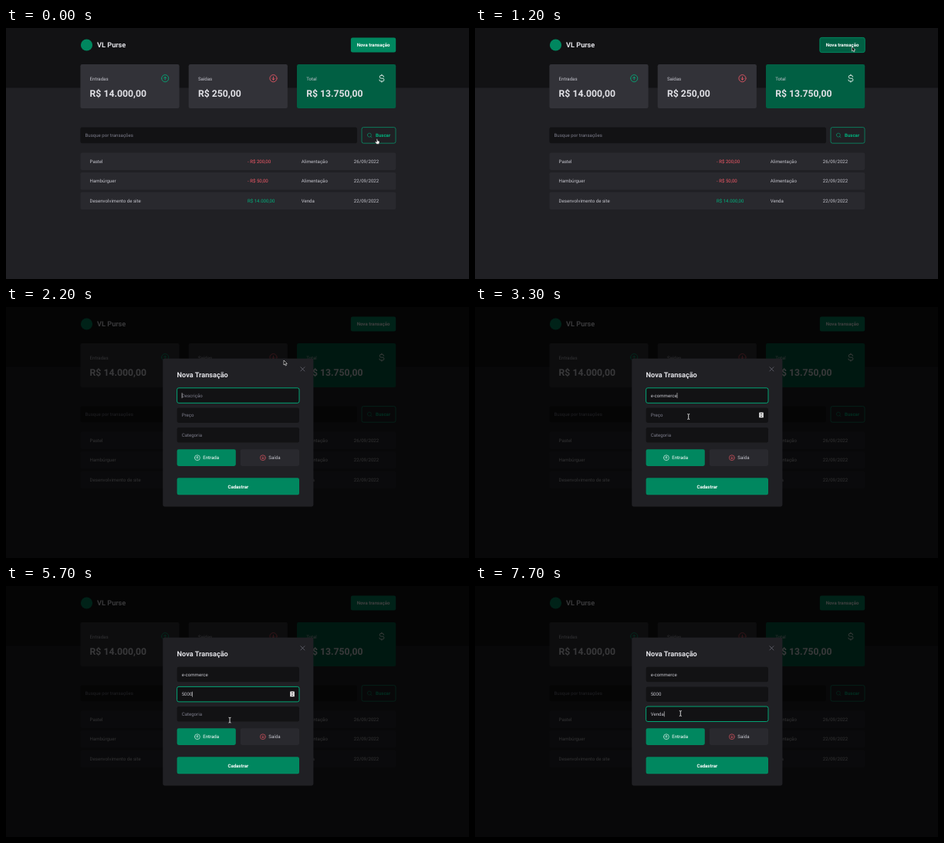
An HTML page that plays this animation: 600 px wide and 325 px high, repeating every 8 s.

```html
<!DOCTYPE html>
<html lang="pt-BR">
<head>
<meta charset="utf-8">
<title>Transações</title>
<style>
html, body { margin: 0; width: 100%; height: 100%; overflow: hidden; background: #202024; }
svg { display: block; width: 600px; height: 325px; font: 6.1px Roboto, sans-serif; text-rendering: geometricPrecision; }
</style>
</head>
<body>
<svg id="stage" viewBox="0 0 600 325" xmlns="http://www.w3.org/2000/svg"></svg>
<script>
const LOOP = 8000, STEP = 100;
const GREEN = '#00875f', DARK_GREEN = '#015f43', LIGHT_GREEN = '#00b37e', RED = '#f75a68';
const INK = '#121214', PANEL = '#202024', ROW = '#29292e', CARD = '#323238';
const TEXT = '#e1e1e6', SOFT = '#c4c4cc', MUTED = '#7c7c8a';

const rect = (x, y, w, h, fill, extra = '') =>
  `<rect x="${x}" y="${y}" width="${w}" height="${h}" rx="2.3" fill="${fill}" ${extra}/>`;
const label = (x, y, text, fill = TEXT, extra = '') =>
  `<text x="${x}" y="${y}" fill="${fill}" ${extra}>${text}</text>`;
const bold = (x, y, text, fill, size = 6.1, anchor = 'start') =>
  label(x, y, text, fill, `font-weight="700" font-size="${size}" text-anchor="${anchor}"`);

// Icons are drawn on a 256 unit grid around their centre.
const icon = (x, y, size, color, path, turn = 0) =>
  `<path transform="translate(${x} ${y}) rotate(${turn}) scale(${size / 256}) translate(-128 -128)" d="${path}"
    fill="none" stroke="${color}" stroke-width="17" stroke-linecap="round" stroke-linejoin="round"/>`;
const ARROW = 'M32 128a96 96 0 1 0 192 0a96 96 0 1 0-192 0M94 122L128 88L162 122M128 168V88';
const DOLLAR = 'M128 24V48M128 208V232M184 88a40 40 0 0 0-40-40H112a40 40 0 0 0 0 80h40a40 40 0 0 1 0 80H104a40 40 0 0 1-40-40';
const LENS = 'M32 116a84 84 0 1 0 168 0a84 84 0 1 0-168 0M175 175L224 224';
const CROSS = 'M200 56L56 200M200 200L56 56';

const card = (x, title, amount, fill) =>
  rect(x, 46.9, 128.2, 57.2, fill) + label(x + 12.2, 67.5, title, SOFT) + bold(x + 12.2, 89, amount, TEXT, 12.2);

const row = ([name, price, kind, date], i) => {
  const y = 161.4 + i * 25.55, base = y + 13.4;
  return rect(96.4, y, 408.9, 22.5, ROW) + label(108.6, base, name, SOFT) +
    label(313, base, price, price[0] === '-' ? RED : LIGHT_GREEN) +
    label(382.7, base, kind, SOFT) + label(450.8, base, date, SOFT);
};

const page = `
  <rect width="600" height="325" fill="${PANEL}"/>
  <rect width="600" height="77.5" fill="${INK}"/>
  <circle cx="104.5" cy="22" r="7.6" fill="${GREEN}"/>
  ${bold(118, 25.2, 'VL Purse', TEXT, 9.16)}
  ${rect(446.9, 12.4, 58.3, 19.2, GREEN, 'id="newButton" stroke-width="1"')}
  ${bold(476, 24.2, 'Nova transação', '#fff', 6.1, 'middle')}
  ${card(96.4, 'Entradas', 'R$ 14.000,00', CARD)}
  ${card(236.7, 'Saídas', 'R$ 250,00', CARD)}
  ${card(377, 'Total', 'R$ 13.750,00', DARK_GREEN)}
  ${icon(206.2, 65.2, 12.2, LIGHT_GREEN, ARROW)}
  ${icon(346.5, 65.2, 12.2, RED, ARROW, 180)}
  ${icon(486.9, 65.2, 12.2, '#fff', DOLLAR)}
  ${rect(96.4, 128.5, 358.6, 20.8, INK)}
  ${label(102.5, 141.2, 'Busque por transações', MUTED)}
  ${rect(461, 128.6, 44, 20.6, 'none', `stroke="${LIGHT_GREEN}" stroke-width=".6"`)}
  ${icon(471.2, 139, 7.6, LIGHT_GREEN, LENS)}
  ${bold(479, 141.2, 'Buscar', LIGHT_GREEN)}
  ${[
    ['Pastel', '- R$ 200,00', 'Alimentação', '26/09/2022'],
    ['Hambúrguer', '- R$ 50,00', 'Alimentação', '22/09/2022'],
    ['Desenvolvimento de site', 'R$ 14.000,00', 'Venda', '22/09/2022']
  ].map(row).join('')}`;

const hints = ['Descrição', 'Preço', 'Categoria'];
const fieldTop = i => 104.8 + i * 25.6;
const field = (_, i) =>
  rect(221.6, fieldTop(i), 158.4, 19.5, INK, `id="box${i}" stroke-width=".9"`) +
  label(227.7, fieldTop(i) + 12, '', MUTED, `id="value${i}"`);

const modal = `<g id="modal">
  <rect width="600" height="325" opacity=".75"/>
  ${rect(203.2, 66.8, 195.2, 191.6, PANEL)}
  ${bold(221.6, 90.5, 'Nova Transação', TEXT, 9.16)}
  <rect id="closeRing" x="379.5" y="75.4" width="10" height="10" fill="none" stroke="${LIGHT_GREEN}" stroke-width=".8"/>
  ${icon(384.4, 80.4, 9.15, MUTED, CROSS)}
  ${hints.map(field).join('')}
  <g id="spinner"><rect x="368.2" y="136.4" width="5.6" height="6.9" rx=".6" fill="#e8e8e8"/>
    <path d="M369.6 139.1L371 137.6L372.4 139.1ZM369.6 140.7L371 142.2L372.4 140.7Z" fill="#333"/></g>
  <rect id="caret" width=".5" height="7" fill="#fff"/>
  ${rect(221.6, 184.3, 76.2, 21.6, GREEN)}${rect(303.8, 184.3, 76.2, 21.6, ROW)}
  ${icon(247.9, 195.2, 9.15, '#fff', ARROW)}${label(255.2, 197.4, 'Entrada', '#fff')}
  ${icon(332.9, 195.2, 9.15, RED, ARROW, 180)}${label(340.3, 197.4, 'Saída', SOFT)}
  ${rect(221.6, 221.2, 158.4, 22, GREEN)}
  ${bold(300.8, 234.5, 'Cadastrar', '#fff', 6.1, 'middle')}
</g>`;

const pointers = `
  <path id="arrow" d="M0 0V6L1.4 4.8L2.4 7L3.4 6.5L2.5 4.4H4.3Z" fill="#000" stroke="#fff" stroke-width=".6"/>
  <path id="beam" d="M-1.5-3.4Q0-3.4 0-2.6Q0-3.4 1.5-3.4M0-2.6V2.6M-1.5 3.4Q0 3.4 0 2.6Q0 3.4 1.5 3.4" fill="none" stroke="#fff" stroke-width=".8"/>
  <path id="hand" d="M-.8-3Q0-3.8 .4-3L.8-.9L2.5-.4Q3.2 0 2.9 1.2L2.3 3.2H-.7L-2.6 .7Q-2.4-.3-1.3 .2L-.4 .7Z" fill="#fff" stroke="#111" stroke-width=".4"/>`;

document.getElementById('stage').innerHTML = page + modal + pointers;
const $ = id => document.getElementById(id);
const show = (id, on) => $(id).setAttribute('display', on ? 'inline' : 'none');

// Pointer stops: time, x, y.
const stops = [
  [0, 481, 147], [200, 400, 184], [400, 203, 217], [600, 290, 165], [900, 440, 25],
  [1000, 475, 25], [1100, 488.5, 24], [1200, 488.5, 24], [1300, 463, 50],
  [1500, 410, 105], [1800, 330, 190], [2100, 300, 114], [2300, 420, 24],
  [2500, 466.5, 90], [3100, 466.5, 90], [3300, 276.7, 142], [3600, 292, 140],
  [3700, 294, 140], [5400, 294, 140], [5600, 301, 178], [5900, 268, 165],
  [6100, 268, 165], [6200, 267, 165], [6600, 267, 165], [7700, 266.3, 165], [LOOP, 266.3, 165]
];
const hiddenSpans = [[2800, 3200], [4200, 5500], [6700, 7700]];

// Each field: when focus arrives and when each piece of text is typed.
const typed = [
  { focus: 2100, keys: [[2800, 'e-'], [2900, 'co'], [3000, 'mm'], [3100, 'er'], [3200, 'ce']] },
  { focus: 3500, keys: [[4100, '5'], [4500, '0'], [4700, '0'], [5000, '0']] },
  { focus: 6000, keys: [[6700, 'V'], [7000, 'e'], [7100, 'n'], [7300, 'd'], [7500, 'a']] }
];

function pointerAt(t) {
  const i = stops.findIndex(s => s[0] > t);
  const [t0, x0, y0] = stops[i - 1], [t1, x1, y1] = stops[i];
  const k = (t - t0) / (t1 - t0);
  return [x0 + (x1 - x0) * k, y0 + (y1 - y0) * k];
}

const inside = (x, y, left, top, right, bottom) => x > left && x < right && y > top && y < bottom;

function drawPointer(t, x, y, open) {
  const overField = open
    ? hints.some((_, i) => inside(x, y, 221.6, fieldTop(i), 380, fieldTop(i) + 19.5))
    : inside(x, y, 96, 128, 455, 149);
  const overSearch = !open && inside(x, y, 461, 128, 505, 149);
  const kind = overField ? 'beam' : overSearch ? 'hand' : 'arrow';
  const hidden = hiddenSpans.some(([from, to]) => t >= from && t < to);
  for (const id of ['arrow', 'beam', 'hand']) show(id, id === kind && !hidden);
  $(kind).setAttribute('transform', `translate(${x} ${y})`);
}

function drawForm(t, x, y) {
  const focused = typed.filter(f => t >= f.focus).length - 1;
  typed.forEach(({ keys }, i) => {
    const value = keys.filter(k => t >= k[0]).map(k => k[1]).join('');
    const node = $('value' + i);
    node.textContent = value || hints[i];
    node.setAttribute('fill', value ? SOFT : MUTED);
    $('box' + i).setAttribute('stroke', i === focused ? LIGHT_GREEN : 'none');
    if (i === focused) {
      $('caret').setAttribute('x', 227.8 + (value ? node.getComputedTextLength() : 0));
      $('caret').setAttribute('y', fieldTop(i) + 6.3);
    }
  });
  show('caret', focused >= 0 && !(t >= 6500 && t < 6700));
  show('closeRing', focused < 0);
  show('spinner', focused === 1 || inside(x, y, 221.6, fieldTop(1), 380, fieldTop(1) + 19.5));
}

function draw(time) {
  const t = Math.floor((time % LOOP) / STEP) * STEP;
  const open = t >= 1300, pressed = t >= 1000 && !open;
  const [x, y] = pointerAt(t);
  show('modal', open);
  $('newButton').setAttribute('fill', pressed ? DARK_GREEN : GREEN);
  $('newButton').setAttribute('stroke', pressed ? GREEN : 'none');
  if (open) drawForm(t, x, y);
  drawPointer(t, x, y, open);
}

let start;
function tick(now) {
  start ??= now;
  draw(now - start);
  requestAnimationFrame(tick);
}
draw(0);
requestAnimationFrame(tick);
</script>
</body>
</html>
```
